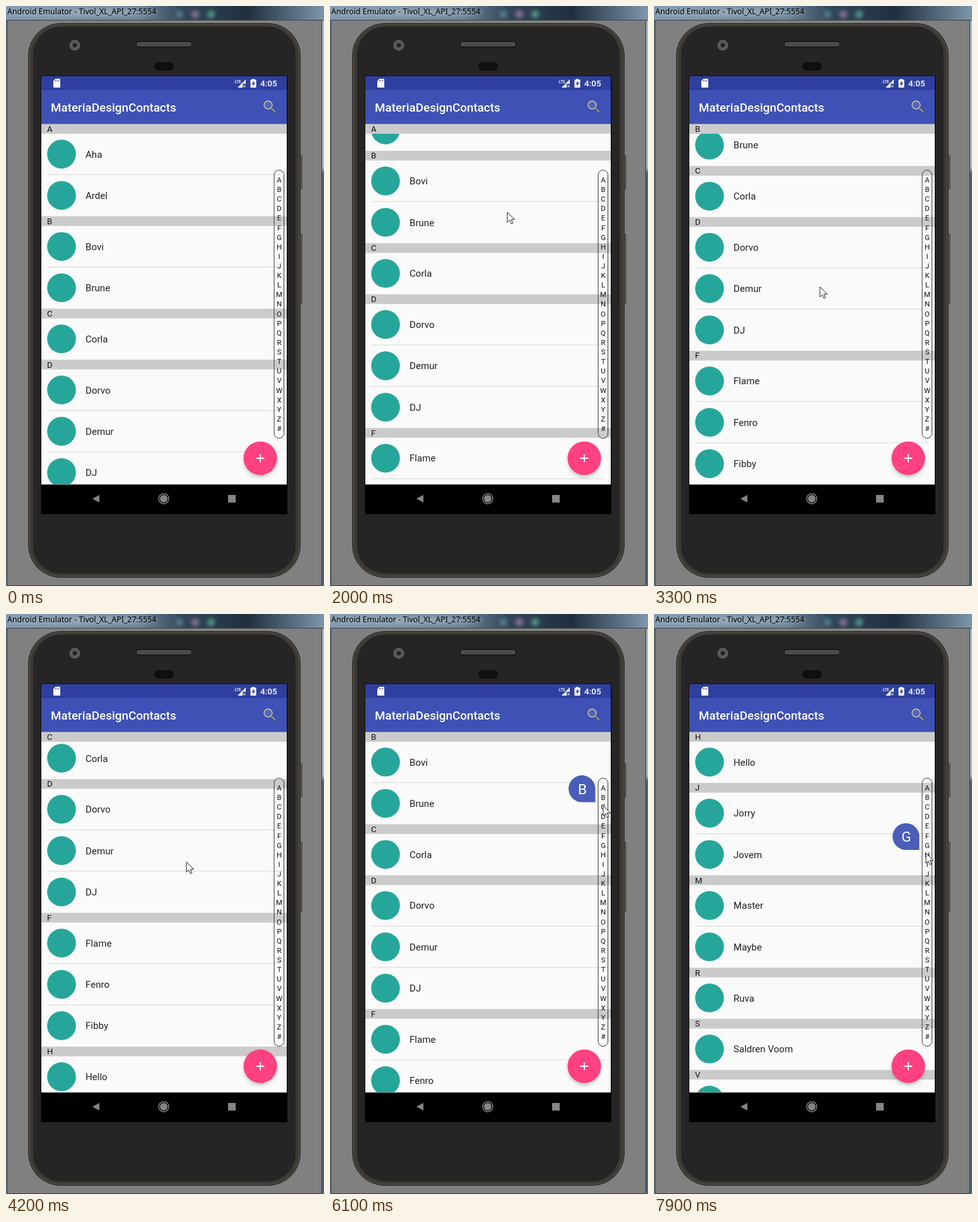
Recreate the animation shown at these times as an HTML page. Size 504 by 917 pixels, loop 8 s.

```html
<!DOCTYPE html>
<html lang="en">
<head>
<meta charset="utf-8">
<title>Contacts</title>
<style>
html, body { margin: 0; width: 100%; height: 100%; overflow: hidden; background: #808080; }
svg { display: block; }
text { font-family: Roboto, sans-serif; }
.caption { font: 12.4px 'Noto Sans', sans-serif; }
.name { font-size: 15.1px; fill: #212121; }
.head { font-size: 13.2px; fill: #111; }
.index { font-size: 11.3px; fill: #111; text-anchor: middle; }
</style>
</head>
<body>
<svg width="504" height="917" viewBox="0 0 504 917">
  <defs>
    <linearGradient id="glass">
      <stop offset="0" stop-color="#8399ad"/>
      <stop offset=".42" stop-color="#6b8195"/>
      <stop offset=".56" stop-color="#32465a"/>
      <stop offset=".76" stop-color="#1f2f3e"/>
      <stop offset="1" stop-color="#7d97ab"/>
    </linearGradient>
    <linearGradient id="edge" x2="0" y2="1">
      <stop offset=".26" stop-color="#a5bac9"/>
      <stop offset=".27" stop-color="#54687a"/>
    </linearGradient>
    <filter id="soft" x="-50%" y="-50%" width="200%" height="200%"><feGaussianBlur stdDeviation="3"/></filter>
    <clipPath id="bar"><rect width="504" height="22"/></clipPath>
    <clipPath id="view"><rect x="56" y="186" width="389" height="570.5"/></clipPath>
  </defs>

  <!-- window -->
  <rect width="504" height="917" fill="#808080"/>
  <rect width="504" height="22" fill="url(#glass)"/>
  <g clip-path="url(#bar)"><g filter="url(#soft)">
    <ellipse cx="120" cy="10" rx="122" ry="7" fill="#b4c3d0" opacity=".5"/>
    <circle cx="275" cy="13" r="5" fill="#5e8795"/>
    <circle cx="300" cy="13" r="6" fill="#8a7394"/>
    <circle cx="325" cy="13" r="6" fill="#4f9a86"/>
  </g></g>
  <text class="caption" x="2" y="13">Android Emulator - Tivol_XL_API_27:5554</text>
  <path d="M0 22.5H504" stroke="#38434e"/>
  <rect x="501" y="23" width="3" height="894" fill="url(#edge)"/>
  <path d="M.5 23V917" stroke="#6d7f90"/>
  <path d="M1.5 23V916.5H500.5V23" fill="none" stroke="#2c3238"/>

  <!-- phone -->
  <g fill="#5c5853" stroke="#45413d" stroke-width=".5">
    <rect x="464" y="236" width="5.5" height="54" rx="1.5"/>
    <rect x="464" y="360" width="5.5" height="111" rx="1.5"/>
  </g>
  <rect x="35.5" y="27.5" width="431" height="876" rx="51" fill="#3b3733" stroke="#302c29"/>
  <rect x="37.5" y="29.5" width="427" height="872" rx="49" fill="none" stroke="#5a554f"/>
  <rect x="44" y="34" width="414" height="862" rx="43" fill="#262424" stroke="#1c1a1a"/>
  <circle cx="109" cy="62" r="8" fill="#555251" stroke="#716d6a"/>
  <circle cx="109" cy="62" r="4.5" fill="#292728" stroke="#86817e"/>
  <rect x="206" y="56" width="89" height="9" rx="4.5" fill="#4c4a49" stroke="#111" stroke-width="1.5"/>
  <rect x="235" y="89" width="31" height="13" rx="6.5" fill="#100f0f"/>
  <rect x="55.5" y="110.5" width="390.5" height="693"/>
  <rect x="56" y="111" width="389" height="22" fill="#303f9f"/>
  <rect x="56" y="186" width="389" height="570.5" fill="#fafafa"/>

  <!-- contacts -->
  <g clip-path="url(#view)">
    <g id="list"></g>
    <rect x="56" y="186" width="389" height="16" fill="#cbcbcb"/>
    <text id="sticky" class="head" x="65" y="198.7"></text>
    <rect x="425" y="259.5" width="15.5" height="424" rx="7.75" fill="none" stroke="#333"/>
    <g id="index"></g>
    <circle cx="403" cy="718.5" r="25.5" opacity=".27" filter="url(#soft)"/>
    <circle cx="403" cy="715" r="26.5" fill="#ff4081"/>
    <path d="M396.5 715h13M403 708.500v13" stroke="#fff" stroke-width="1.8"/>
    <g id="bubble">
      <path d="M420.5 297.5H399.3A21.2 21.2 0 1 1 420.5 276.3Z" fill="#4a5db8"/>
      <text id="letter" x="400" y="284.5" font-size="22.5" fill="#fff" text-anchor="middle"></text>
    </g>
  </g>

  <!-- status bar and toolbar -->
  <rect x="56" y="133" width="389" height="53.5" fill="#3f51b5"/>
  <g fill="#fff">
    <path d="M78.5 115H85q1 0 1 1v12q0 1-1 1H76q-1 0-1-1V118.500Z"/>
    <path d="M78.5 117v2.5M81 117v2.5M83.5 117v2.5" stroke="#303f9f"/>
    <text x="362.5" y="121.5" font-size="6.3" font-weight="500">LTE</text>
    <path d="M367 129L380 116V123H375V129Z"/>
    <path d="M376 125l3.500 3.500m0-3.500l-3.500 3.500" stroke="#fff"/>
    <path d="M390.5 115h3v1.500h3V129h-9V116.500h3Z"/>
    <path d="M393 118l-3.500 5.500h2v3.500l3.500-5.500h-2Z" fill="#303f9f"/>
    <text x="403" y="127" font-size="13.5" font-weight="500">4:05</text>
    <text x="71" y="167" font-size="18.85" font-weight="500">MateriaDesignContacts</text>
  </g>
  <path d="M420.500 162l6 6" stroke="#55555f" stroke-width="3.5" stroke-linecap="round"/>
  <path d="M420.500 161.500l6 6" stroke="#aaa" stroke-width="1.5" stroke-linecap="round"/>
  <circle cx="415.5" cy="156.500" r="6.3" fill="#5566bd" stroke="#5a5a6c" stroke-width="2.4"/>
  <circle cx="415.5" cy="156.500" r="6.3" fill="none" stroke="#ccc" stroke-width="1.4"/>

  <!-- navigation -->
  <g fill="#858585">
    <path d="M137 779L148 773V785Z"/>
    <circle cx="250" cy="779" r="8" fill="none" stroke="#858585" stroke-width="1.5"/>
    <circle cx="250" cy="779" r="6"/>
    <rect x="352" y="773" width="12" height="12"/>
  </g>

  <path id="cursor" d="M0 0V16L3.700 12.600 6.200 18.400 8.800 17.300 6.300 11.600H11.500Z" fill="#fff" stroke="#222"/>
</svg>

<script>
const $ = id => document.getElementById(id);
const move = (id, x, y) => $(id).setAttribute("transform", `translate(${x} ${y})`);
const show = (id, on) => $(id).style.display = on ? "" : "none";

const LOOP = 8000, TICK = 100;
const TOP = 186.3, HEAD = 15.4, ROW = 65.35, STEP = 15.115;
const LETTERS = "ABCDEFGHIJKLMNOPQRSTUVWXYZ#";
const NAMES = ["Aha", "Ardel", "Bovi", "Brune", "Corla", "Dorvo", "Demur", "DJ",
  "Flame", "Fenro", "Fibby", "Hello", "Jorry", "Jovem", "Master", "Maybe",
  "Ruva", "Saldren Voom", "Vesto"];

// Each new initial opens a section; names inside one are split by a line.
const sections = [];
let bottom = 0, html = "";
for (const name of NAMES) {
  const key = name[0];
  if (sections.at(-1)?.key !== key) {
    sections.push({ key, y: bottom });
    html += `<rect x="56" y="${bottom}" width="389" height="${HEAD}" fill="#cbcbcb"/>
      <text class="head" x="65" y="${bottom + 12.4}">${key}</text>`;
    bottom += HEAD;
  } else {
    html += `<path d="M65 ${bottom - .5}H435" stroke="#d8d8d8"/>`;
  }
  const mid = bottom + ROW / 2;
  html += `<circle cx="88" cy="${mid - .3}" r="22.8" fill="#26a69a"/>
    <text class="name" x="126" y="${mid + 5.2}">${name}</text>`;
  bottom += ROW;
}
$("list").innerHTML = html;
$("index").innerHTML = [...LETTERS].map((c, i) =>
  `<text class="index" x="433" y="${279 + i * STEP}">${c}</text>`).join("");

const span = (t, from, to) => Math.min(1, Math.max(0, (t - from) / (to - from)));
const ease = p => (1 - Math.cos(Math.PI * p)) / 2;

// Pointer moves: start, end, x, y
const ENTER = 200, TOUCH = 5500;
const MOVES = [
  [200, 500, 254, 470], [900, 1200, 250, 433], [1200, 2000, 281, 326],
  [2000, 2500, 291, 235], [2500, 3300, 263, 444], [3300, 4200, 286, 392],
  [4200, 4900, 474, 305], [4900, 5300, 435, 284], [5500, 6100, 433, 303],
  [6500, 7900, 431, 378]
];
const pointer = t => MOVES.reduce(([x, y], [from, to, x2, y2]) => {
  const p = span(t, from, to);
  return [x + (x2 - x) * p, y + (y2 - y) * p];
}, [444, 214]);

// Two swipes on the list
const swipe = t => 225.6 * ease(span(t, 1007, 3103)) + 111 * ease(span(t, 3300, 4800));

function draw(now) {
  const t = Math.floor(now % LOOP / TICK) * TICK;
  const [x, y] = pointer(t);
  const touching = t >= TOUCH;
  let scroll = swipe(t);

  if (touching) {
    const i = Math.floor((y - 282) / STEP);
    scroll = sections.find(s => s.key >= LETTERS[i]).y;
    $("letter").textContent = LETTERS[i];
    move("bubble", 0, (i - 1) * STEP);
  }
  show("bubble", touching);
  move("list", 0, TOP - scroll);
  $("sticky").textContent = sections.filter(s => s.y <= scroll + .1).pop().key;
  show("cursor", t >= ENTER);
  move("cursor", x, y);
}
function loop() {
  draw(performance.now());
  requestAnimationFrame(loop);
}
loop();
</script>
</body>
</html>
```
